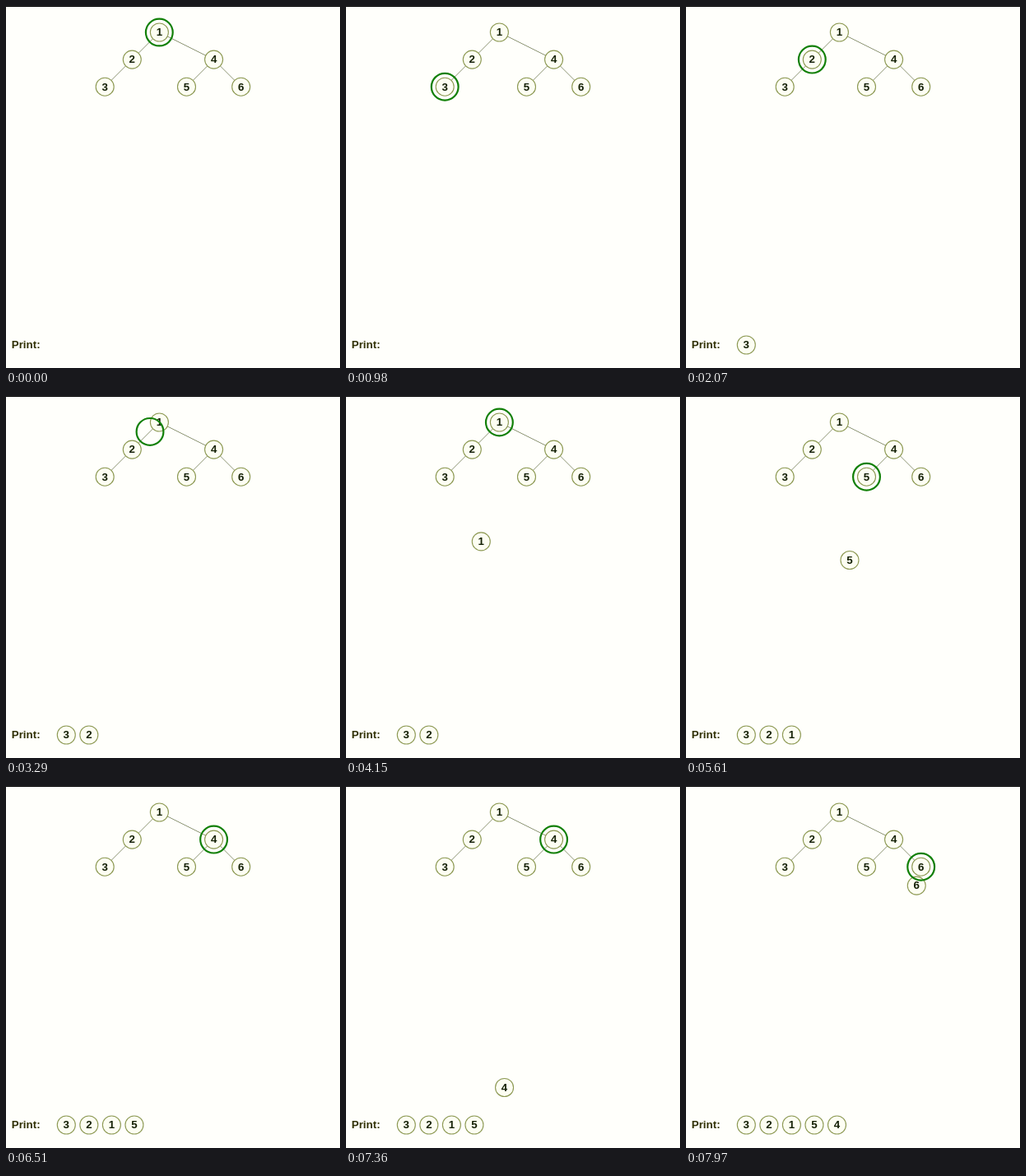
Animation, 406 px wide and 440 px high, one loop 8 s. Source, as an HTML page:

```html
<!DOCTYPE html>
<html lang="en">
<head>
<meta charset="utf-8">
<title>In-order print</title>
<style>
  html, body { margin: 0; width: 100%; height: 100%; overflow: hidden; background: #fffffb; }
  svg { display: block; width: 100vw; height: 100vh; }
  text { font: bold 13.33px "Liberation Sans", Arial, sans-serif; fill: #142004; }
  .caption { fill: #303004; }
  .node circle { fill: #fdfef2; stroke: #8c9852; stroke-width: 1.1; }
  .node text { text-anchor: middle; }
  .edge { stroke: #8c9472; stroke-width: 1; }
  .ring { fill: none; stroke: #128008; stroke-width: 2.2; }
</style>
</head>
<body>
<svg viewBox="0 0 406 440">
  <rect width="406" height="440" fill="#fffffb"/>
  <rect width="406" height="1" fill="#000"/>
  <g id="edges"></g>
  <g id="tree"></g>
  <text class="caption" x="6.8" y="416">Print:</text>
  <g id="labels"></g>
  <circle id="ring" class="ring" r="16.4"/>
</svg>
<script>
const LOOP = 8000;
const STEP = 496;   // one traversal step
const MOVE = 480;   // travel time within a step
const GAP = 33.1;   // tree grid spacing
const NS = "http://www.w3.org/2000/svg";
const root = {
  value: 1,
  left: { value: 2, left: { value: 3 } },
  right: { value: 4, left: { value: 5 }, right: { value: 6 } }
};

const byId = id => document.getElementById(id);
const mix = (a, b, p) => a.map((v, i) => v + (b[i] - v) * p);
const slot = i => [73.3 + 27.55 * i, 412];

function add(parent, tag, attrs) {
  const el = document.createElementNS(NS, tag);
  for (const key in attrs) el.setAttribute(key, attrs[key]);
  return parent.appendChild(el);
}

function place(el, [x, y]) {
  el.setAttribute("transform", `translate(${x.toFixed(2)} ${y.toFixed(2)})`);
}

function addNode(parent, { value, pos }) {
  const g = add(parent, "g", { class: "node" });
  add(g, "circle", { r: 11 });
  add(g, "text", { y: 4.3 }).textContent = value;
  place(g, pos);
  return g;
}

function addEdge(a, b) {
  const [x1, y1] = a.pos, [x2, y2] = b.pos;
  add(byId("edges"), "line", { class: "edge", x1, y1, x2, y2 });
}

// Columns follow in-order rank, rows follow depth.
let rank = 0;
function layout(node, depth = 0) {
  if (node.left) layout(node.left, depth + 1);
  node.pos = [120.2 + GAP * rank++, 32 + GAP * depth];
  if (node.right) layout(node.right, depth + 1);
  addNode(byId("tree"), node);
  for (const child of [node.left, node.right]) if (child) addEdge(node, child);
}

// The traversal records one move per step; coming back from the left costs a pause.
const moves = [];
let step = 0, printed = 0;
const ring = byId("ring");
function move(el, from, to) {
  moves.push({ el, from, to, start: STEP * step++ });
}

function visit(node) {
  const { left, right, pos } = node;
  if (left) {
    move(ring, pos, left.pos);
    visit(left);
    move(ring, left.pos, pos);
    step++;
  }
  move(addNode(byId("labels"), node), pos, slot(printed++));
  if (right) {
    move(ring, pos, right.pos);
    visit(right);
    move(ring, right.pos, pos);
  }
}

function draw(t) {
  place(ring, root.pos);
  for (const { el, from, to, start } of moves) {
    const started = t > start;
    if (el !== ring) el.style.display = started ? "" : "none";
    if (started) place(el, mix(from, to, Math.min(1, (t - start) / MOVE)));
  }
}

layout(root);
visit(root);

const began = performance.now();
function tick() {
  draw((performance.now() - began) % LOOP);
  requestAnimationFrame(tick);
}
draw(0);
requestAnimationFrame(tick);
</script>
</body>
</html>
```
